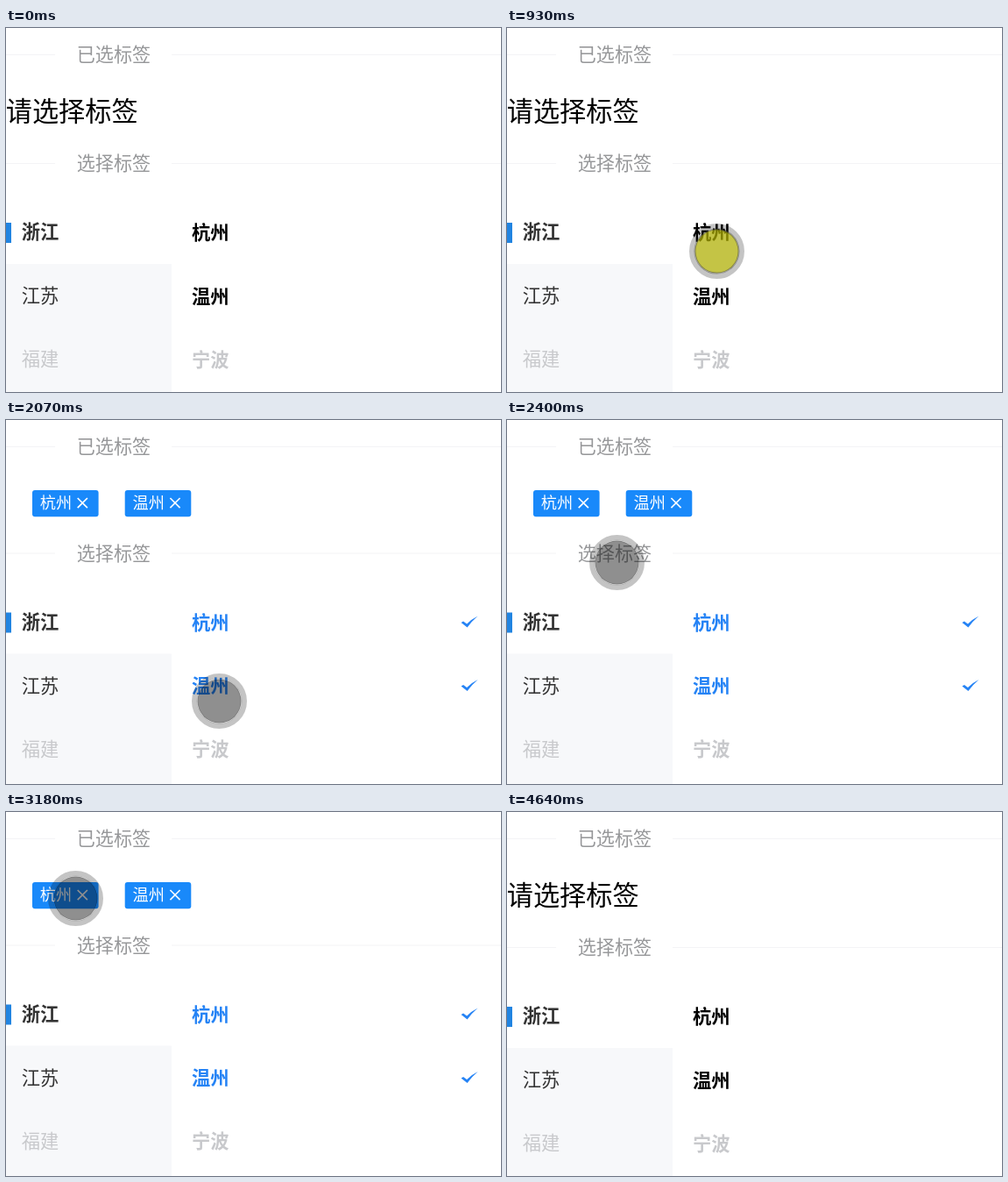
Write an HTML page that moves like this. It is 565 px wide and 415 px high and loops after 5380 ms.

```html
<!DOCTYPE html>
<html lang="zh-CN">
<head>
<meta charset="utf-8">
<title>选择标签</title>
<style>
  html, body { margin: 0; width: 100%; height: 100%; overflow: hidden; background: #fff; }
  svg { display: block; width: 565px; height: 415px; }
  text { font: 21.3px "Noto Sans CJK SC", "Noto Sans CJK", sans-serif; fill: #333; }
  .label { font-size: 21.1px; fill: #969799; }
  .hint { font-size: 30.2px; fill: #000; }
  .bold { font-weight: 700; }
  .city { font-weight: 700; fill: #000; }
  .city.on, .check { fill: #2583f5; }
  .city.off, .off { fill: #c8c9cc; }
  .rule { fill: #f4f4f6; }
  .tag rect { fill: #1989fa; }
  .tag text { font-size: 18.2px; fill: #fff; }
  .tag path { stroke: #fff; stroke-width: 1.7; fill: none; }
  .ring { fill: none; stroke: rgb(0 0 0 / .23); stroke-width: 6; }
  .core { fill: rgb(0 0 0 / .44); stroke: rgb(0 0 0 / .12); stroke-width: 2; }
  .pressed .core { fill: rgb(174 174 0 / .73); stroke: rgb(60 60 60 / .45); }
</style>
</head>
<body>
<svg viewBox="0 0 565 415">
  <rect class="rule" y="30" width="56" height="1"/>
  <rect class="rule" x="189" y="30" width="376" height="1"/>
  <text class="label" x="80.7" y="37.5">已选标签</text>
  <text class="hint" id="hint" x="-0.3" y="105.5">请选择标签</text>
  <g id="tags"></g>
  <g id="picker">
    <rect class="rule" y="154" width="56" height="1"/>
    <rect class="rule" x="189" y="154" width="376" height="1"/>
    <text class="label" x="80.7" y="162">选择标签</text>
    <rect y="269" width="189" height="160" fill="#f7f8fa"/>
    <rect y="222" width="6" height="23" fill="#2184e1"/>
    <text class="bold" x="17.8" y="240">浙江</text>
    <text x="17.8" y="313">江苏</text>
    <text class="off" x="17.8" y="385">福建</text>
    <g id="cities"></g>
    <text class="city off" x="212" y="385.5">宁波</text>
  </g>
  <g id="cursor">
    <circle class="ring" r="28.5"/>
    <circle class="core" r="25"/>
  </g>
</svg>
<script>
const LOOP = 5380, TICK = 40, ENTER = 490, LEAVE = 4640;
const $ = id => document.getElementById(id);
const show = (el, on) => el.setAttribute('visibility', on ? 'visible' : 'hidden');

const clicks = [
  { press: 930, release: 1060, toggle: 1220, city: '杭州' },
  { press: 1830, release: 1910, toggle: 2070, city: '温州' },
  { press: 3100, release: 3180, toggle: 3340, city: '杭州' },
  { press: 3810, release: 3890, toggle: 4090, city: '温州' }
];

const entry = [397.5, 384];
const moves = [
  { from: ENTER, until: 680, to: [239.5, 254.5] },
  { from: 1180, until: 1460, to: [260.5, 327.5] },
  { from: 1550, until: 1750, to: [243.5, 320.5] },
  { from: 2080, until: 2400, to: [125.5, 162.5] },
  { from: 2400, until: 2560, to: [107.5, 105.5] },
  { from: 2570, until: 2860, to: [83.5, 95.5] },
  { from: 2980, until: 3020, to: [79.5, 98.5] },
  { from: 4230, until: 4590, to: [524, 398] }
];

function add(parent, markup) {
  parent.insertAdjacentHTML('beforeend', markup);
  return parent.lastElementChild;
}

const cities = ['杭州', '温州'].map((name, i) => {
  const row = add($('cities'), `<g transform="translate(0 ${i * 72.5})">
    <text class="city" x="212" y="241">${name}</text>
    <path class="check" d="M519.5 233.5l2.5-1.5 4 3q5.5-5.5 12.5-9-6.5 5.5-12 13z"/></g>`);
  const [text, check] = row.children;
  return { name, text, check };
});

const tags = [0, 1].map(i => add($('tags'),
  `<g class="tag" transform="translate(${30 + i * 105.7} 80)">
    <rect width="75.6" height="30.3" rx="3"/><text x="8.8" y="21.3"></text>
    <path d="M51.7 9l11.2 11.2m0-11.2l-11.2 11.2"/></g>`));

function selectedAt(t) {
  const selected = new Set();
  for (const { toggle, city } of clicks) {
    if (t >= toggle && !selected.delete(city)) selected.add(city);
  }
  return [...selected];
}

// The pointer is sampled every TICK, so it advances in small jumps.
function cursorAt(t) {
  let pos = entry;
  for (const { from, until, to } of moves) {
    if (t < from) break;
    const elapsed = Math.floor((t - from) / TICK) * TICK;
    const k = t >= until ? 1 : elapsed / (until - from);
    pos = pos.map((p, i) => p + (to[i] - p) * k);
  }
  return pos;
}

function render(t) {
  const selected = selectedAt(t);
  show($('hint'), !selected.length);
  $('picker').setAttribute('transform', `translate(0 ${selected.length ? -2.5 : 0})`);
  for (const { name, text, check } of cities) {
    const on = selected.includes(name);
    text.classList.toggle('on', on);
    show(check, on);
  }
  tags.forEach((tag, i) => {
    show(tag, i < selected.length);
    tag.querySelector('text').textContent = selected[i] || '';
  });

  const cursor = $('cursor');
  show(cursor, t >= ENTER && t < LEAVE);
  cursor.setAttribute('transform', `translate(${cursorAt(t)})`);
  cursor.classList.toggle('pressed', clicks.some(c => t >= c.press && t < c.release));
}

const start = performance.now();
function frame() {
  render((performance.now() - start) % LOOP);
  requestAnimationFrame(frame);
}
frame();
</script>
</body>
</html>
```
